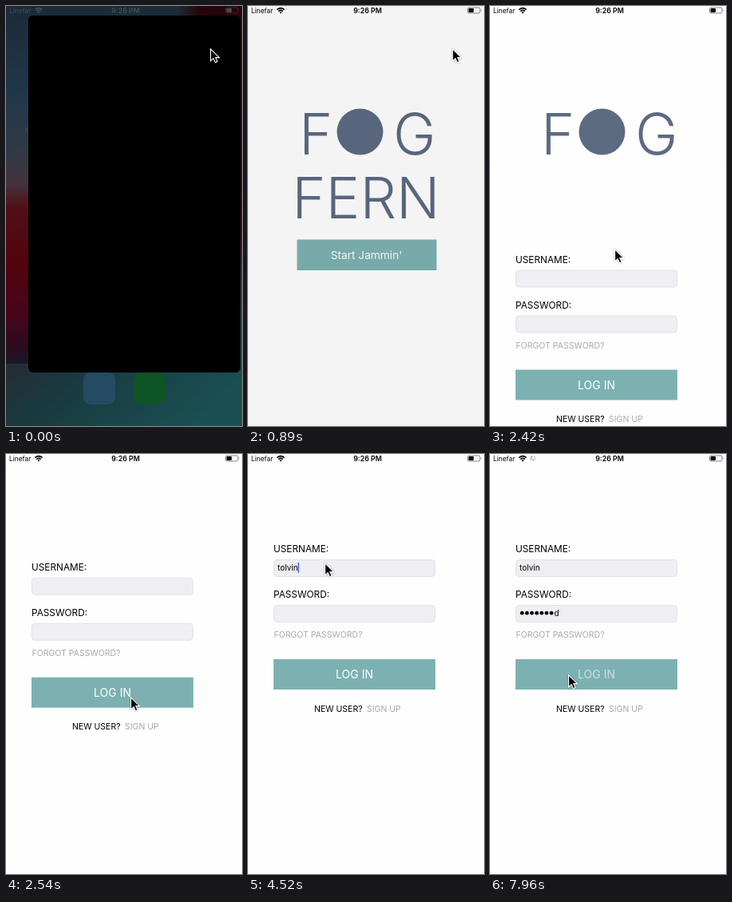
An HTML page for the animation above (7.99 s loop, 296 by 526 pixels).

```html
<!DOCTYPE html>
<html lang="en">
<head>
<meta charset="utf-8">
<title>App launch and log in</title>
<style>
  html, body { margin: 0; width: 100%; height: 100%; overflow: hidden; background: #000; }
  svg { display: block; width: 100%; height: 100%; font-family: Inter, "Liberation Sans", sans-serif; }
  .title { font-size: 72px; font-weight: 300; fill: #5b6b82; }
  .label { font-size: 11.8px; fill: #000; }
  .small { font-size: 10.5px; }
  .btn { font-size: 14px; fill: #fff; text-anchor: middle; }
  .entry { font-size: 10px; fill: #000; }
  .field { fill: #eeeef3; stroke: #e2e2e6; }
  .teal { fill: #7db1b1; }
  .muted { fill: #a9a9ac; }
  #start { font-size: 13.7px; }
  #cursor { filter: drop-shadow(0 .8px .8px rgba(0, 0, 0, .35)); }
</style>
</head>
<body>
<svg viewBox="0 0 296 526" xmlns="http://www.w3.org/2000/svg">
  <defs>
    <linearGradient id="wall" x1="0" y1="0" x2="0" y2="1">
      <stop offset="0" stop-color="#1b2a37"/>
      <stop offset=".2" stop-color="#20374a"/>
      <stop offset=".34" stop-color="#2f3947"/>
      <stop offset=".42" stop-color="#44343c"/>
      <stop offset=".48" stop-color="#500f18"/>
      <stop offset=".62" stop-color="#54030d"/>
      <stop offset=".74" stop-color="#45061b"/>
      <stop offset=".81" stop-color="#2b0c1e"/>
      <stop offset=".86" stop-color="#191a28"/>
    </linearGradient>
    <linearGradient id="corner">
      <stop offset="0" stop-color="#24050a" stop-opacity="0"/>
      <stop offset=".35" stop-color="#24050a"/>
      <stop offset="1" stop-color="#2c040a"/>
    </linearGradient>
    <linearGradient id="edge" x1="0" y1="0" x2="0" y2="1">
      <stop offset="0" stop-color="#2c040a"/>
      <stop offset=".6" stop-color="#3c0710"/>
      <stop offset=".8" stop-color="#2b3a41"/>
      <stop offset="1" stop-color="#1d4b50"/>
    </linearGradient>
    <linearGradient id="dock" x1="0" y1="0" x2="1" y2=".3">
      <stop offset="0" stop-color="#242d33"/>
      <stop offset=".35" stop-color="#193a40"/>
      <stop offset="1" stop-color="#1a4f53"/>
    </linearGradient>
    <g id="status">
      <text x="4" y="9" font-size="8.4">Linefar</text>
      <g fill="none" stroke="currentColor" stroke-width="1.5">
        <path d="M36.3 4.6Q41 .6 45.7 4.6M38.2 6.6Q41 4.2 43.8 6.6"/>
      </g>
      <path d="M39.5 7.9Q41 6.8 42.5 7.9L41 9.4Z"/>
      <text x="150" y="9" font-size="8.8" font-weight="600" text-anchor="middle">9:26 PM</text>
      <rect x="275.5" y="2" width="15.5" height="7" rx="1.8" fill="none" stroke="currentColor" stroke-width=".8" opacity=".6"/>
      <rect x="276.6" y="3.1" width="6.4" height="4.8" rx=".8"/>
      <path d="M292 4.2q1.4 1.3 0 2.6z" opacity=".6"/>
    </g>
  </defs>

  <g id="home">
    <rect width="296" height="526" fill="url(#wall)"/>
    <rect x="215" width="81" height="20" fill="url(#corner)"/>
    <rect x="286" width="10" height="448" fill="url(#edge)"/>
    <rect y="448" width="296" height="78" fill="url(#dock)"/>
    <rect x="97" y="459" width="40" height="40" rx="9" fill="#254b63"/>
    <rect x="160" y="459" width="40" height="40" rx="9" fill="#0f5427"/>
    <text x="24" y="158" font-size="7" fill="#4a5963">E</text>
    <use href="#status" fill="#434f57" color="#434f57"/>
  </g>
  <rect id="panel" fill="#000"/>

  <g id="app">
    <rect width="296" height="526" fill="#fefefe"/>
    <text class="title" x="64" y="186">F</text>
    <circle cx="140.5" cy="157.5" r="29" fill="#5b6b82"/>
    <text class="title" x="182" y="186">G</text>
    <text class="title" x="148" y="265.5" text-anchor="middle">FERN</text>
    <rect class="teal" x="61.5" y="292.5" width="175" height="38.5"/>
    <text class="btn" id="start" x="148.5" y="317">Start Jammin'</text>

    <g id="login">
      <rect width="296" height="526" fill="#fefefe"/>
      <text class="label" x="32" y="123">USERNAME:</text>
      <rect class="field" x="32.5" y="132.5" width="202" height="21" rx="4"/>
      <text class="entry" id="user" x="37" y="146"></text>
      <text class="label" x="32" y="180">PASSWORD:</text>
      <rect class="field" x="32.5" y="189.5" width="202" height="21" rx="4"/>
      <g id="dots"></g>
      <text class="entry" id="last" y="203"></text>
      <rect id="caret" width="1.5" height="13" fill="#4566d6"/>
      <text class="small muted" x="32.5" y="230">FORGOT PASSWORD?</text>
      <rect class="teal" x="32" y="257" width="203" height="38"/>
      <text class="btn" id="enter" x="133.5" y="281">LOG IN</text>
      <text class="small" x="83" y="322.5">NEW USER?</text>
      <text class="small muted" x="149" y="322.5">SIGN UP</text>
    </g>
    <use href="#status" fill="#000" color="#000"/>
    <g id="spinner"></g>
  </g>

  <path id="cursor" d="M.6 .8V15.8L4.1 12.6L6.5 17.8L9.1 16.7L6.9 11.6H11.5Z" fill="#000" stroke="#fff" stroke-width="1.1"/>
</svg>
<script>
const LOOP = 7990;
const NS = "http://www.w3.org/2000/svg";
const $ = id => document.getElementById(id);
const set = (el, attrs) => { for (const k in attrs) el.setAttribute(k, attrs[k]); };
const add = (parent, tag, attrs) => {
  const el = document.createElementNS(NS, tag);
  set(el, attrs);
  return parent.appendChild(el);
};
const write = (el, s) => { if (el.textContent !== s) el.textContent = s; };
const clamp = x => Math.max(0, Math.min(1, x));
const part = (t, a, b) => clamp((t - a) / (b - a));
const mix = (a, b, p) => a + (b - a) * p;
const smooth = p => p * p * (3 - 2 * p);
const easeOut = p => 1 - (1 - p) ** 3;
const count = (times, t) => times.filter(x => t >= x).length;

const USER = "tolvin", PASS = "password";
const userTimes = [4080, 4290, 4370, 4440, 4440, 4520];
const passTimes = [5300, 5380, 5680, 6250, 6640, 6760, 6910, 7090];
const DOT = 6.15;

// start, end, x, y of each pointer move
const moves = [
  [1330, 1590, 165, 278],
  [1780, 2030, 156, 304],
  [2885, 3180, 96, 136],
  [7275, 7580, 98, 276]
];

const dots = PASS.split("").map((c, i) =>
  add($("dots"), "circle", { cx: 40.2 + DOT * i, cy: 199.2, r: 2.4 }));
const ticks = Array.from({ length: 8 }, (_, i) =>
  add($("spinner"), "path", {
    d: "M0-1.7V-3.4", stroke: "#333", "stroke-width": 0.9,
    transform: `translate(54 5.2) rotate(${i * 45})`
  }));

function drawLaunch(t) {
  const p = easeOut(part(t, 50, 350));
  set($("panel"), {
    x: mix(28, 0, p), y: mix(12, 0, p),
    width: mix(266, 296, p), height: mix(447, 526, p), rx: mix(6, 0, p)
  });
  set($("home"), { opacity: 1 - p });
  set($("app"), { opacity: t < 890 ? 0 : t < 950 ? 0.96 : 1 });
}

function drawLogin(t) {
  const x = Math.max(0, t - 2330) * 0.02343;
  const y = t >= 2760 ? 0 : 526 * (1 + x) * Math.exp(-x);
  set($("login"), { transform: `translate(0 ${y.toFixed(2)})` });

  write($("user"), USER.slice(0, count(userTimes, t)));
  const n = count(passTimes, t);
  dots.forEach((d, i) => set(d, { opacity: i < n - 1 ? 1 : 0 }));
  write($("last"), n ? PASS[n - 1] : "");
  const lastX = 37.4 + DOT * Math.max(0, n - 1);
  set($("last"), { x: lastX });

  const inPass = t >= 4820;
  const end = inPass
    ? (n ? lastX + $("last").getComputedTextLength() : 37)
    : 37 + $("user").getComputedTextLength();
  set($("caret"), {
    x: end, y: inPass ? 192.5 : 135.8,
    opacity: t >= 3600 && t < 7700 ? 1 : 0
  });
}

function drawPress(t) {
  const down = part(t, 2040, 2130), up = part(t, 2340, 2590);
  set($("start"), { opacity: 1 - 0.8 * (down - up) });
  const press = part(t, 7600, 7690), release = part(t, 7830, 8080);
  set($("enter"), { opacity: 1 - 0.8 * (press - release) });
}

function drawSpinner(t) {
  const turn = Math.floor(t / 83);
  ticks.forEach((tick, i) => {
    const age = (((turn - i) % 8) + 8) % 8;
    set(tick, { opacity: t < 7830 ? 0 : 1 - age * 0.1 });
  });
}

function drawCursor(t) {
  let x = 256, y = 53;
  for (const [a, b, toX, toY] of moves) {
    const p = smooth(part(t, a, b));
    x = mix(x, toX, p);
    y = mix(y, toY, p);
  }
  set($("cursor"), { transform: `translate(${x.toFixed(2)} ${y.toFixed(2)})` });
}

function draw(t) {
  drawLaunch(t);
  drawLogin(t);
  drawPress(t);
  drawSpinner(t);
  drawCursor(t);
}

let start;
function tick(now) {
  if (start === undefined) start = now;
  draw((now - start) % LOOP);
  requestAnimationFrame(tick);
}
draw(0);
requestAnimationFrame(tick);
</script>
</body>
</html>
```
